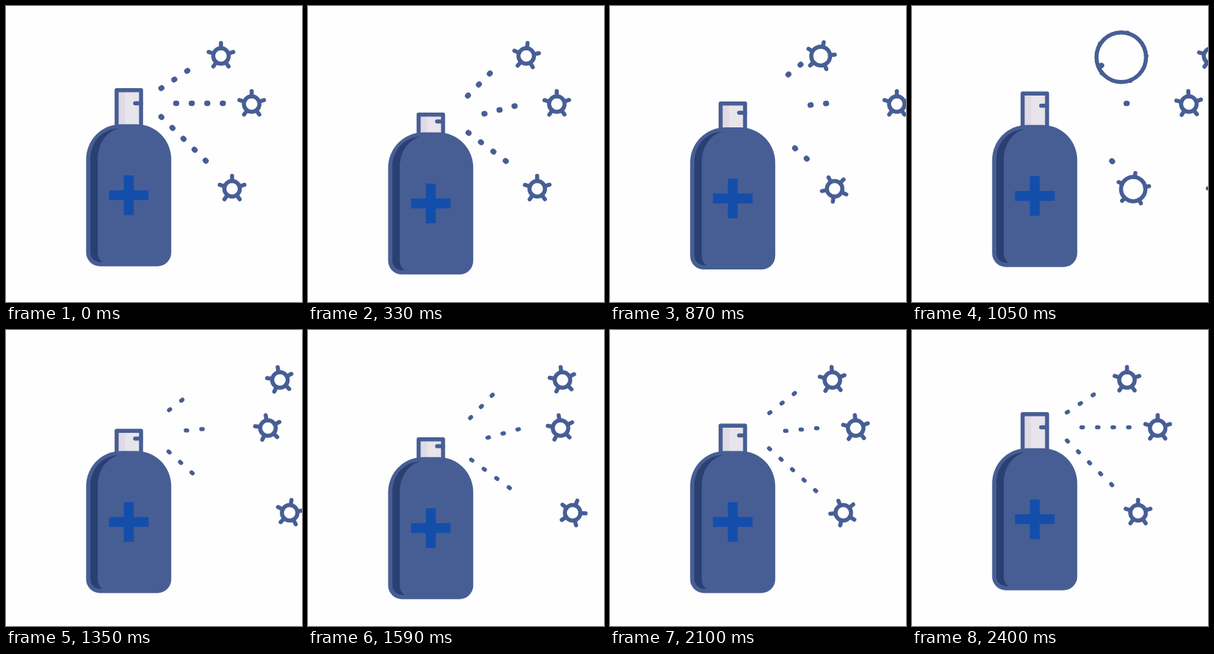
Animation, 400 px wide and 400 px high, one loop 4.43 s. Source, as an HTML page with a canvas:

```html
<!DOCTYPE html>
<html>
<head>
<meta charset="utf-8">
<title>Sanitizer spray</title>
<style>
html, body { margin: 0; height: 100%; overflow: hidden; background: #fefefe; }
canvas { display: block; width: 100vw; height: 100vh; }
</style>
</head>
<body>
<canvas id="stage"></canvas>
<script>
const LOOP = 4430, END = 2400, STEP = 30, PRESS = 1200;
const BLUE = '#475e95', SHADE = '#2b4072', CROSS = '#144eab', CAP = '#e8e4eb', CAP_SHADE = '#dfdae4';
const LINE = 5.5;

const canvas = document.getElementById('stage');
const ctx = canvas.getContext('2d');
const dpr = window.devicePixelRatio || 1;
canvas.width = canvas.height = 400 * dpr;

const lerp = (a, b, u) => a + (b - a) * u;
const ramp = (t, from, to) => Math.min(1, Math.max(0, (t - from) / (to - from)));
const smooth = u => (1 - Math.cos(Math.PI * u)) / 2;
const smoothRamp = (t, from, to) => smooth(ramp(t, from, to));

// cubic-bezier(.167, .167, .667, 1), solved by bisection
function easeOut(x) {
  const curve = (a, b, s) => 3 * a * (1 - s) ** 2 * s + 3 * b * (1 - s) * s * s + s ** 3;
  let lo = 0, hi = 1;
  for (let i = 0; i < 24; i++) {
    const mid = (lo + hi) / 2;
    if (curve(.167, .667, mid) < x) lo = mid; else hi = mid;
  }
  return curve(.167, 1, lo);
}

function stroke(width, ...points) {
  ctx.lineWidth = width;
  ctx.beginPath();
  points.forEach(([x, y]) => ctx.lineTo(x, y));
  ctx.stroke();
}

// Each germ sways, swells and pops while its successor enters from the right
const germs = [
  { x: 290.5, y: 67.5, pop: 1080, sway: .67, spin: 14, power: .8, enter: 900, far: 130, turn: -10 },
  { x: 332, y: 132.5, pop: 755, sway: .8, spin: -52, power: 4.4, enter: 450, far: 87, turn: -10 },
  { x: 305.5, y: 247, pop: 1222, sway: .8, spin: -52, power: 4.4, enter: 900, far: 127, turn: -64 }
];

function drawGerm(x, y, angle, swell) {
  const r = 10.5 + 27 * swell, tip = r + 7 * Math.max(0, 1 - 1.05 * swell);
  ctx.lineWidth = LINE;
  ctx.beginPath();
  ctx.arc(x, y, r, 0, 2 * Math.PI);
  ctx.stroke();
  for (let i = 0; i < 5; i++) {
    const a = (angle - 90 + 72 * i) * Math.PI / 180;
    const at = d => [x + d * Math.cos(a), y + d * Math.sin(a)];
    stroke(LINE, at(r), at(tip));
  }
}

function drawGerms(t) {
  const sec = t / 1000;
  const tilt = ramp(t, 950, 1350) * ramp(t, END, 1350) ** .85;
  for (const g of germs) {
    if (t <= g.pop) {
      const swell = ramp(t, g.pop - 240, g.pop) ** 1.2;
      const dx = 7.7 * Math.sqrt(sec) * Math.sin(Math.PI * sec / g.sway);
      drawGerm(g.x + dx, g.y + 2 * swell, g.spin * sec ** g.power, swell);
    }
    if (t >= g.enter) {
      const left = 1 - easeOut(ramp(t, g.enter, g.enter + 1500));
      drawGerm(g.x + g.far * left, g.y, g.turn * tilt, 0);
    }
  }
}

// Spray lines: start x, start y, end x, end y
const jets = [[210, 111, 257.5, 79.3], [230, 131.5, 294, 131.5], [210, 150, 280, 219]];

function drawSpray(t, push) {
  const first = t < 1221;
  const from = first ? ramp(t, 611, 1221) : 0;
  const to = first ? 1 : ramp(t, 1221, 1410);
  const offset = 14 * (smoothRamp(t, 0, 570) - smoothRamp(t, 1830, END));
  const width = first ? 7.4 : LINE, half = first ? .5 : 1;
  for (const [x0, y, x1, y1] of jets) {
    const y0 = y + 17.5 * push;
    const len = Math.hypot(x1 - x0, y1 - y0);
    const at = d => [lerp(x0, x1, d / len), lerp(y0, y1, d / len)];
    for (let d = from * len + offset; d <= to * len + .5; d += 21)
      stroke(width, at(d - half), at(d + half));
  }
}

function drawBottle(drop, squash) {
  ctx.save();
  ctx.translate(0, drop);

  const scale = 1 - .474 * squash;
  const top = 160 - 46.2 * scale, slot = 160 - 28.5 * scale;
  ctx.fillStyle = CAP;
  ctx.fillRect(149.5, top, 33, 170 - top);
  ctx.fillStyle = CAP_SHADE;
  ctx.fillRect(149.5, top, 11.5, 170 - top);
  stroke(LINE, [149.5, 170], [149.5, top], [182.5, top], [182.5, 170]);
  stroke(LINE, [174.5, slot], [182.5, slot]);

  ctx.fillStyle = BLUE;
  ctx.beginPath();
  ctx.roundRect(108.3, 159.7, 115, 192, [47.5, 47.5, 18.5, 18.5]);
  ctx.fill();

  ctx.fillStyle = SHADE;
  ctx.fill(new Path2D('M152 165.5C130 166 114 184 114 207V333C114 340 120 346 127 346H130.5' +
    'C126 343 124 338 124 333V207C124 187 135 170 152 165.5Z'));

  ctx.fillStyle = CROSS;
  ctx.fillRect(159.2, 229, 13.4, 53.5);
  ctx.fillRect(139.2, 249, 53.4, 13.4);
  ctx.restore();
}

function draw(t) {
  ctx.setTransform(dpr, 0, 0, dpr, 0, 0);
  ctx.fillStyle = '#fefefe';
  ctx.fillRect(0, 0, 400, 400);
  ctx.strokeStyle = BLUE;
  ctx.lineCap = ctx.lineJoin = 'round';

  const p = t % PRESS;
  const push = smoothRamp(p, 0, 400) - smoothRamp(p, 400, PRESS);
  const squash = smoothRamp(p, 0, 200) - smoothRamp(p, 630, PRESS);
  drawBottle(12 * push, squash);
  drawSpray(t, push);
  drawGerms(t);
}

const start = performance.now();
function frame() {
  const t = (performance.now() - start) % LOOP;
  draw(Math.min(END, Math.floor(t / STEP) * STEP));
  requestAnimationFrame(frame);
}
frame();
</script>
</body>
</html>
```
